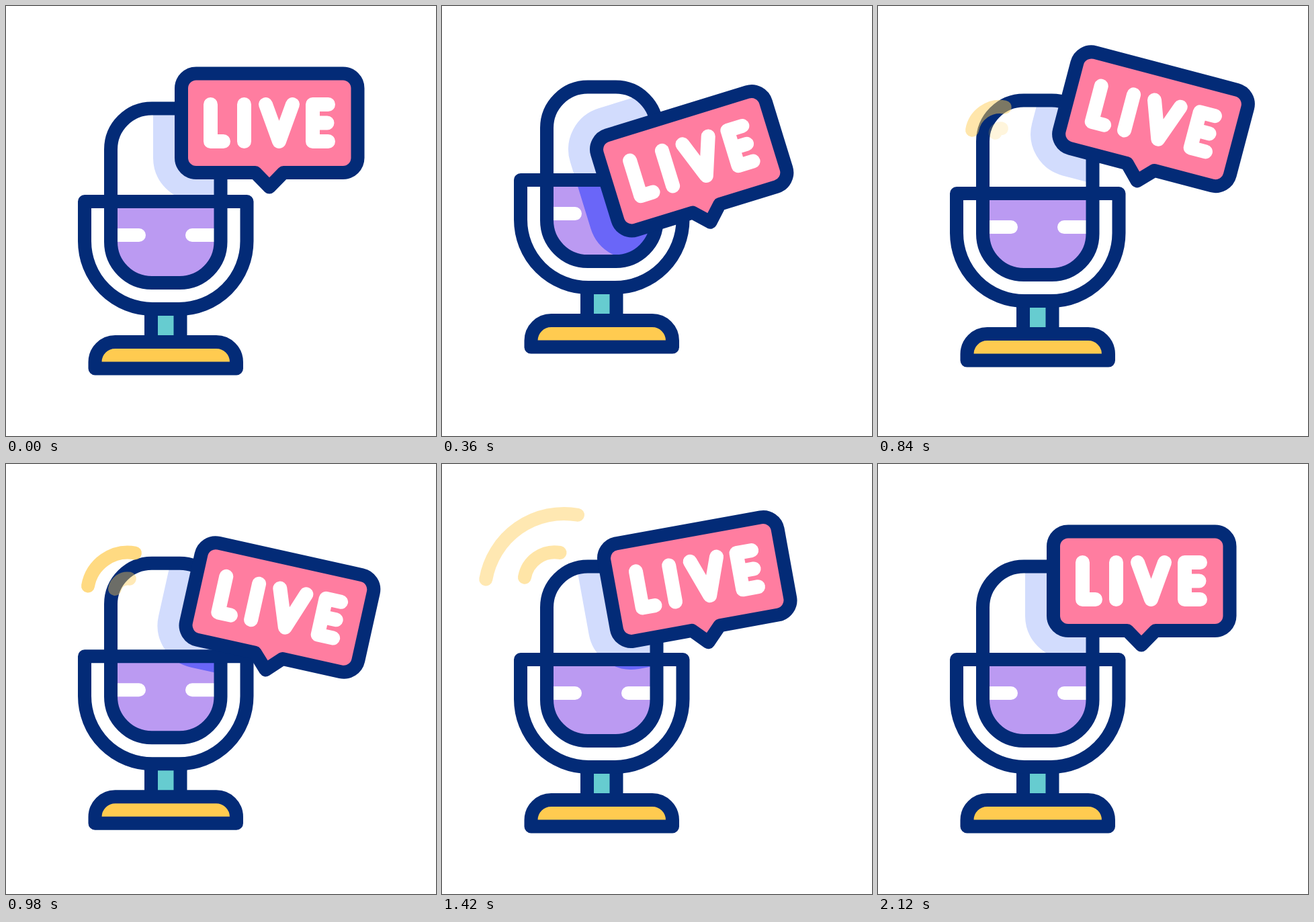
Recreate the animation shown at these times as an HTML page. Size 640 by 640 pixels, loop 2400 ms.

```html
<!DOCTYPE html>
<html lang="en">
<head>
<meta charset="utf-8">
<title>Live microphone</title>
<style>
  html, body { margin: 0; height: 100%; overflow: hidden; background: #fff; }
  svg { display: block; width: 100vw; height: 100vh; }
  .line { fill: none; stroke: #032b77; stroke-width: 20; stroke-linejoin: round; }
  .white { fill: none; stroke: #fff; stroke-linecap: round; stroke-linejoin: round; }
  .wave { fill: none; stroke: #ffcb50; stroke-width: 20; stroke-linecap: round; }
</style>
</head>
<body>
<svg viewBox="0 0 640 640">
  <defs>
    <rect id="capsule" x="156" y="152.5" width="163.5" height="259.5" rx="61"/>
    <rect id="shade" x="261" y="100.5" width="262.5" height="147.5" rx="22" stroke-width="84"/>
    <clipPath id="inside"><use href="#capsule"/></clipPath>
    <clipPath id="upper"><rect x="150" y="140" width="180" height="151"/></clipPath>
    <clipPath id="lower"><rect x="150" y="291" width="180" height="130"/></clipPath>
  </defs>

  <g id="mic">
    <g clip-path="url(#inside)">
      <rect x="150" y="291" width="180" height="130" fill="#bb9af2"/>
      <g clip-path="url(#upper)"><use class="shadow" href="#shade" fill="#d2dcfd" stroke="#d2dcfd"/></g>
      <g clip-path="url(#lower)"><use class="shadow" href="#shade" fill="#6a66f8" stroke="#6a66f8"/></g>
      <path class="white" stroke-width="20" d="M160 341H198M277 341H315"/>
    </g>
    <rect x="216" y="455" width="44" height="40" fill="#66ccd0"/>
    <path class="line" d="M216 455V497M259.5 455V497"/>
    <path class="line" style="fill:#ffcb50" d="M132.5 539.5V530A30 30 0 0 1 162.5 500H313A30 30 0 0 1 343 530V539.5Z"/>
    <use class="line" href="#capsule"/>
    <path class="line" d="M117 291H358.5V350A101 101 0 0 1 257.5 451H218A101 101 0 0 1 117 350Z"/>
  </g>

  <path class="wave" id="outer"/>
  <path class="wave" id="inner"/>

  <g id="bubble">
    <path class="line" style="fill:#ff7da0" d="M283 100.5H501.5A22 22 0 0 1 523.5 122.5V226A22 22 0 0 1 501.5 248H413L392 269.5L371 248H283A22 22 0 0 1 261 226V122.5A22 22 0 0 1 283 100.5Z"/>
    <path class="white" stroke-width="21" role="img" aria-label="LIVE"
      d="M304.5 146.5V201.5H323.5M354.5 146.5V201.5M386.5 146.5L406.5 201.5L426.5 146.5M479.5 146.5H456.5V201.5H479.5M456.5 174H478"/>
  </g>
</svg>
<script>
const LOOP = 2400;
const $ = id => document.getElementById(id);
const shadows = document.querySelectorAll('.shadow');
const smooth = p => (1 - Math.cos(Math.PI * p)) / 2;
const linear = p => p;

// Keys are [time, value] pairs; values hold outside the range.
function track(keys, ease = smooth) {
  return t => {
    const i = keys.findIndex(k => k[0] > t);
    if (i < 0) return keys[keys.length - 1][1];
    if (i === 0) return keys[0][1];
    const [t0, a] = keys[i - 1], [t1, b] = keys[i];
    return a + (b - a) * ease((t - t0) / (t1 - t0));
  };
}

const micY = track([[0, 0], [350, -32], [640, 0], [850, -12], [1080, 0]]);
const bubbleY = track([[0, 0], [370, 53.5], [703, -35], [1060, 47], [1400, -4], [1710, 9.5], [2120, 0]]);
const tilt = track([[0, 0], [375, -17.2], [883, 15.3], [1360, -12], [1650, 4.2], [2120, 0]]);

const outerAlpha = track([[560, 0], [1120, 0.95], [1680, 0]], linear);
const innerAlpha = track([[720, 0], [840, 0.2], [1220, 0.78], [1700, 0.12], [1760, 0]], linear);
const innerR = track([[736, 0], [1160, 32.6], [1700, 59]], linear);
const innerX = track([[736, 184], [1160, 178], [1700, 156.5]], linear);
const innerY = track([[736, 191], [1160, 188], [1700, 164.5]], linear);

// Quarter circle facing up and to the left.
function drawWave(el, x, y, r, alpha) {
  const at = deg => {
    const a = deg * Math.PI / 180;
    return `${x + r * Math.cos(a)} ${y + r * Math.sin(a)}`;
  };
  el.setAttribute('d', `M${at(190)}A${r} ${r} 0 0 1 ${at(280)}`);
  el.setAttribute('opacity', alpha);
}

function draw(t) {
  const lift = micY(t), drop = bubbleY(t);
  const turn = `rotate(${tilt(t)} 392 244)`;
  $('mic').setAttribute('transform', `translate(0 ${lift})`);
  $('bubble').setAttribute('transform', `translate(0 ${drop}) ${turn}`);
  shadows.forEach(s => s.setAttribute('transform', `translate(0 ${drop - lift}) ${turn}`));
  drawWave($('outer'), 181.5, 192, Math.max(0, t - 520) * 0.131, outerAlpha(t));
  drawWave($('inner'), innerX(t), innerY(t), innerR(t), innerAlpha(t));
}

const start = performance.now();
function frame() {
  draw((performance.now() - start) % LOOP);
  requestAnimationFrame(frame);
}
frame();
</script>
</body>
</html>
```
